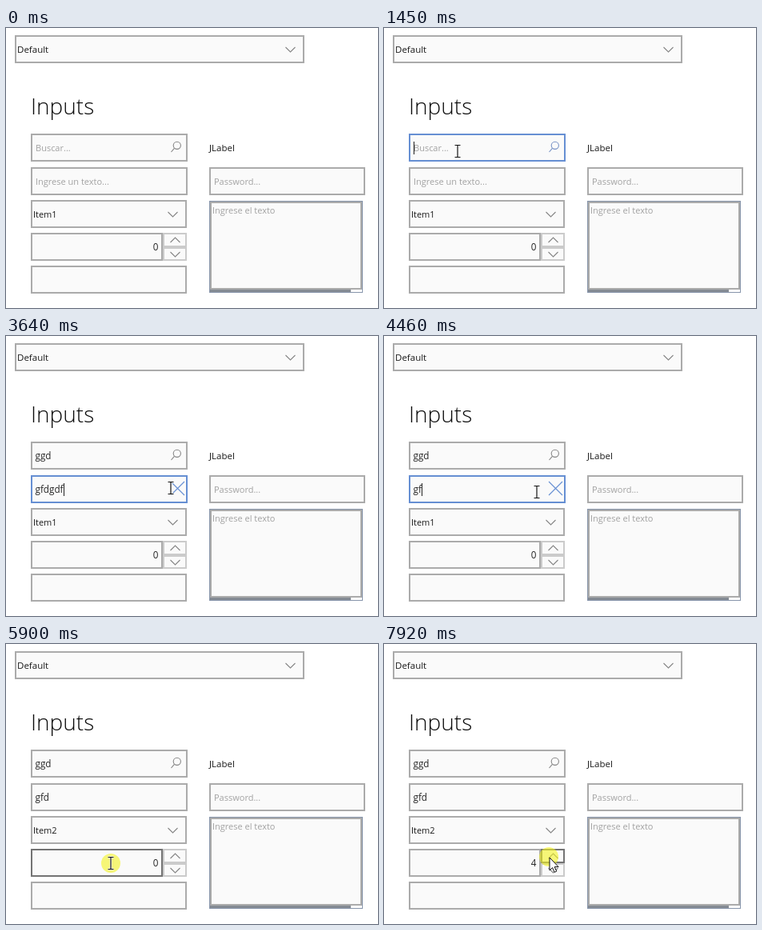
An HTML page that plays this animation: 465 by 350 pixels, repeating every 7990 ms.

```html
<!DOCTYPE html>
<html lang="es">
<head>
<meta charset="utf-8">
<title>Inputs</title>
<style>
html, body { margin: 0; width: 100%; height: 100%; overflow: hidden; background: #fff; }
svg { display: block; width: 465px; height: 350px; }
text { font: 11px "Open Sans", "Noto Sans", sans-serif; fill: #1a1a1a; white-space: pre; }
.title { font-size: 28px; font-weight: 330; fill: #0c0c0c; }
.item { font-size: 11.5px; }
.typed { font-size: 11.7px; fill: #262626; }
.hint { fill: #a2a2a2; }
.icon { fill: none; stroke: #868686; stroke-width: 1.1; }
</style>
</head>
<body>
<svg id="stage" viewBox="0 0 465 350"></svg>
<script>
const LOOP = 7990, STEP = 70;
const GRAY = '#ababab', PALE = '#cbcbcb', DARK = '#747474', BLUE = '#668fd3';
const stage = document.getElementById('stage');

function add(tag, attrs, parent = stage) {
  const el = document.createElementNS('http://www.w3.org/2000/svg', tag);
  for (const k in attrs) el.setAttribute(k, attrs[k]);
  parent.appendChild(el);
  return el;
}
const group = parent => add('g', {}, parent);
const icon = (d, parent) => add('path', { d, class: 'icon' }, parent);
const chevron = (x, y, h) => icon(`M${x - 6} ${y}l6 ${h}l6 ${-h}`);
const fill = (x, y, width, height, color, parent) =>
  add('rect', { x, y, width, height, fill: color }, parent);

// Bordered box given by its outer edges
function box(l, t, r, b, color = GRAY) {
  const el = add('rect', {
    x: l + 1, y: t + 1, width: r - l - 2, height: b - t - 2,
    fill: '#fafafa', stroke: color, 'stroke-width': 2
  });
  return { l, t, r, b, el, color };
}
function label(x, y, content, cls = '', parent) {
  const el = add('text', { x, y, class: cls }, parent);
  el.textContent = content;
  return el;
}
const show = (el, on) => el.setAttribute('visibility', on ? 'visible' : 'hidden');

// Static form
box(11, 9, 373, 44);
label(14, 31, 'Default', 'item');
chevron(355.5, 24, 6);
label(31, 108, 'Inputs', 'title');
label(254, 154, 'JLabel', 'item');
box(254, 174, 449, 209);
label(260, 196, 'Password...', 'hint');
box(255, 217, 445, 327);
add('rect', { x: 254.5, y: 216.5, width: 191, height: 114, fill: 'none', stroke: '#8795ab' });
fill(255, 327, 176, 3, '#858b94');
label(258, 232, 'Ingrese el texto', 'hint');

// Live fields
const search = box(31, 132, 227, 167);
const lens = group();
icon('M210.4 150.4L206.5 155', lens);
add('circle', { cx: 213.8, cy: 146.8, r: 4.6, class: 'icon' }, lens);
const entry = box(31, 174, 227, 209);
const clear = icon('M206 182L223 199M223 182L206 199');
box(31, 215, 226, 250);
chevron(208.5, 230, 6);
const choice = label(34, 237, 'Item1');
const empty = box(31, 297, 226, 332);
const down = box(196, 274, 226, 291, PALE);
const up = box(196, 256, 226, 274, PALE);
const spin = box(31, 256, 196, 291);
chevron(211.5, 268, -6);
chevron(211.5, 280, 6);
const count = label(190.5, 278, '0', 'typed');
count.setAttribute('text-anchor', 'end');

function editor(y, hint) {
  return {
    hint: label(37, y, hint, 'hint'),
    text: label(36.5, y, '', 'typed'),
    caret: fill(0, y - 12, 1, 16, '#222')
  };
}
const searchEdit = editor(154, 'Buscar...');
const entryEdit = editor(196, 'Ingrese un texto...');

// Drop-down list
const popup = group();
for (let i = 6; i > 0; i--)
  add('rect', { x: 31 - i, y: 210, width: 196 + 2 * i, height: 160, opacity: 0.04 }, popup);
fill(31, 210, 196, 160, '#f2f2f2', popup);
const mark = fill(31, 211, 192, 35, '#90adee', popup);
for (let i = 0; i < 4; i++) label(32, 233 + 35 * i, 'Item' + (i + 1), 'item', popup);
fill(223, 211, 3.5, 103, '#858585', popup);

// Pointer
const pointer = group();
const halo = add('circle', { r: 12, fill: '#f4f420', opacity: 0.6 }, pointer);
const arrow = add('path', {
  d: 'M1 1V17L4.5 13.6L7.1 19.3L9.7 18.1L7.2 12.6H12.1Z', fill: '#fff', stroke: '#111'
}, pointer);
const beam = group(pointer);
for (const [color, w] of [['#fff', 2.6], ['#111', 1.2]])
  add('path', {
    d: 'M-3.5 -7.5H3.5M0 -7.5V7.5M-3.5 7.5H3.5', fill: 'none', stroke: color, 'stroke-width': w
  }, beam);

// Moments of the story
const focusSearch = 1230, focusEntry = 2700, clearEntry = 3770, openList = 5050, pickItem = 5800;
const spins = [0, 1, 2, 3].map(i => 7150 + 230 * i);
const clicks = [focusSearch, focusEntry, clearEntry, openList, pickItem, ...spins];

// Pointer stops: time, x, y
const stops = [
  [330, 104, 346], [960, 101, 278], [1100, 90, 142], [2140, 97, 178], [2470, 97, 178],
  [3590, 203, 189], [3770, 220, 192], [4490, 190, 195], [5000, 129, 238],
  [5250, 129, 238], [5970, 131, 280], [6380, 120, 287], [6730, 150, 281], [7130, 206, 266]
];
function pointerAt(t) {
  const i = stops.findIndex(s => s[0] > t);
  const [t1, x1, y1] = stops.at(i);
  const [t0, x0, y0] = i > 0 ? stops[i - 1] : [t1 - 1, x1, y1];
  const p = Math.min(1, (t - t0) / (t1 - t0));
  return [x0 + (x1 - x0) * p, y0 + (y1 - y0) * p].map(Math.round);
}
const typed = (word, t, start, gap) =>
  word.slice(0, Math.max(0, Math.floor((t - start) / gap) + 1));

function setEditor(e, value, caretOn) {
  e.text.textContent = value;
  show(e.hint, !value);
  e.caret.setAttribute('x', Math.round(36.5 + (value ? e.text.getComputedTextLength() : 0)));
  show(e.caret, caretOn);
}

function draw(now) {
  // The screen refreshes in even steps
  const t = Math.floor((now % LOOP - 50) / STEP) * STEP + 50;
  const visible = t >= 330;
  const [x, y] = pointerAt(t);
  const open = t >= openList && t < pickItem;
  const inSearch = t >= focusSearch && t < focusEntry;
  const inEntry = t >= focusEntry && t < openList;
  const blink = Math.floor((t - focusSearch) / 500) % 2 === 0;
  const over = f => visible && !open && x >= f.l && x < f.r && y >= f.t && y < f.b;

  for (const f of [search, entry, spin, empty, up, down]) {
    const focused = f === search && inSearch || f === entry && inEntry;
    f.el.setAttribute('stroke', focused ? BLUE : over(f) ? DARK : f.color);
  }
  for (const part of lens.children) part.style.stroke = inSearch ? '#7892c6' : '';
  show(clear, over(entry));
  clear.style.stroke = inEntry ? BLUE : '';

  setEditor(searchEdit, t < 2500 ? typed('gg', t, 2140, 70) : 'ggd', inSearch && blink);
  setEditor(entryEdit,
    t < clearEntry ? typed('gfdgdf', t, 2880, 110) : typed('gfd', t, 4200, 140),
    inEntry && blink);
  choice.textContent = t < pickItem ? 'Item1' : 'Item2';
  count.textContent = spins.filter(s => s <= t).length;

  show(popup, open);
  mark.setAttribute('y', y < 246 ? 211 : 246);

  const text = [search, entry, spin, empty].some(over) && !(over(entry) && x > 206);
  pointer.setAttribute('transform', `translate(${x} ${y})`);
  show(arrow, visible && !text);
  show(beam, visible && text);
  show(halo, clicks.some(c => t >= c && t < c + 130));
}

const begin = performance.now();
function tick() {
  draw(performance.now() - begin);
  requestAnimationFrame(tick);
}
tick();
</script>
</body>
</html>
```
